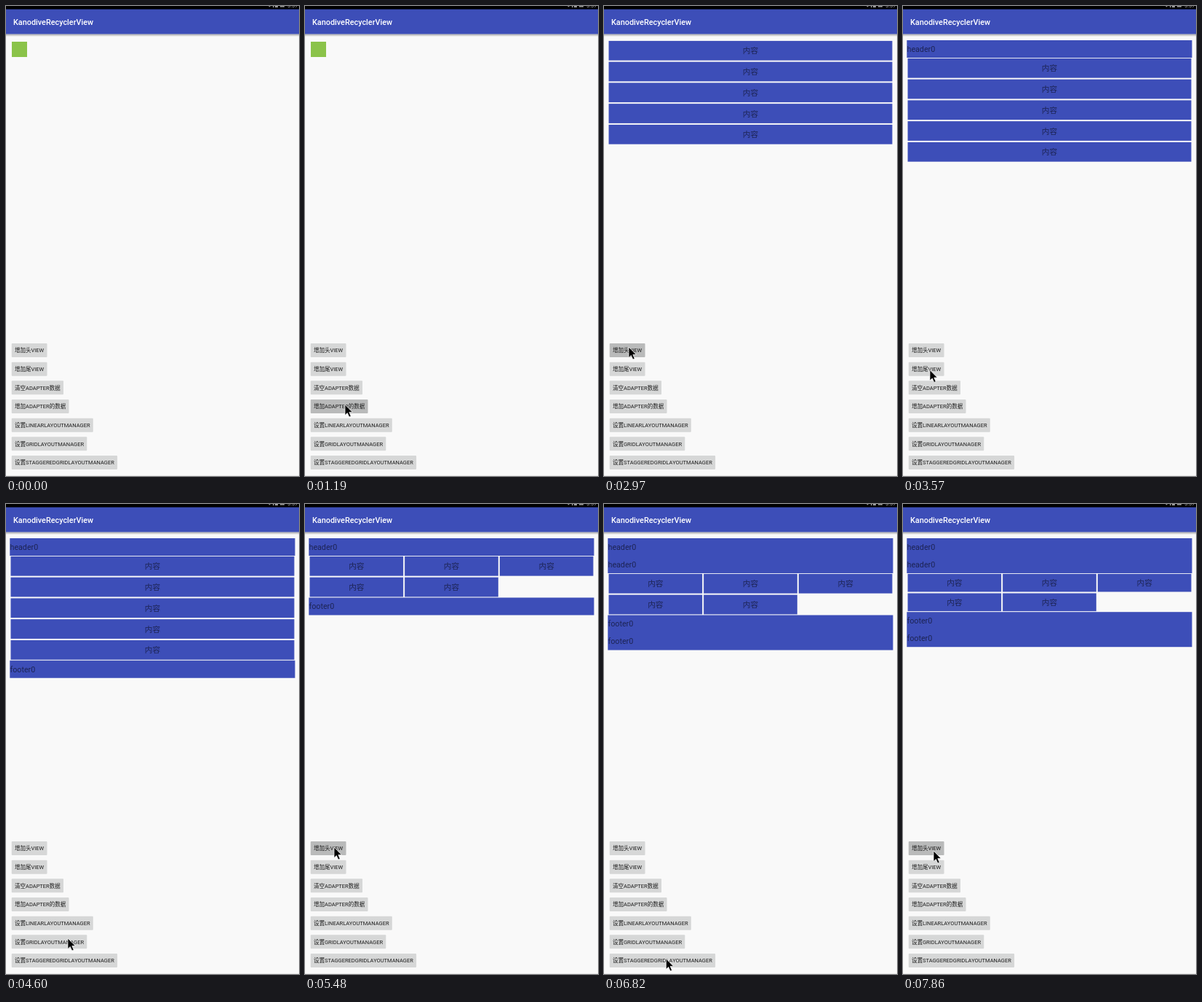
These frames come from a looping animation (403 by 645 pixels, 8 s). An HTML page:

```html
<!DOCTYPE html>
<html lang="zh-CN">
<head>
<meta charset="utf-8">
<title>RecyclerView demo</title>
<style>
  html, body { margin: 0; width: 100%; height: 100%; overflow: hidden; background: #f9f9f9; }
  svg { display: block; width: 403px; height: 645px; font-family: Roboto, "Noto Sans CJK SC", "Noto Sans CJK", sans-serif; }
  .title { font-size: 10.85px; font-weight: 500; fill: #fff; }
  .button { font-size: 7.5px; fill: #1c1c1c; }
  .row { font-size: 10.7px; fill: #1d2454; }
  .clock { font-size: 7.5px; fill: #aaa; }
</style>
</head>
<body>
<svg viewBox="0 0 403 645">
  <defs>
    <linearGradient id="shade" x2="0" y2="1">
      <stop stop-color="#000" stop-opacity=".35"/>
      <stop offset="1" stop-color="#000" stop-opacity="0"/>
    </linearGradient>
  </defs>
  <rect width="403" height="645" fill="#f9f9f9"/>
  <rect y="644" width="403" height="1" fill="#ececec"/>
  <rect y="38.500" width="403" height="3.500" fill="url(#shade)"/>
  <rect y="4" width="403" height="34.500" fill="#3d4eb8"/>
  <rect width="403" height="4.500" fill="#000"/>
  <path d="M361 0h3l-1.500 1.500zM367 0h1.500v2h-1.500zM370 0h4v2h-4zM377 0h6v1.500h-6z" fill="#999"/>
  <text class="clock" x="387" y="2">5:57</text>
  <text class="title" x="10" y="25.600">KanodiveRecyclerView</text>
  <g id="list"></g>
  <g id="buttons"></g>
  <path id="cursor" d="M0 0V14.500L3.300 11.500L5.800 17L8.200 16L5.800 10.500H10.300Z" fill="#000" stroke="#fff" stroke-width=".7"/>
</svg>
<script>
const LOOP = 8000, STEPS = 54;
const BLUE = '#3d4eb8';
const BAR = 24;
const $ = id => document.getElementById(id);

const labels = [
  '增加头VIEW', '增加尾VIEW', '清空ADAPTER数据', '增加ADAPTER的数据',
  '设置LINEARLAYOUTMANAGER', '设置GRIDLAYOUTMANAGER', '设置STAGGEREDGRIDLAYOUTMANAGER'
];
const HEADER = 0, FOOTER = 1, ITEMS = 3, GRID = 5, STAGGERED = 6;

// where the pointer goes, and what it presses there
const stops = [
  { step: 0, x: 309, y: 646 },
  { step: 5, x: 36, y: 519 },
  { step: 8, x: 55, y: 547, press: ITEMS },
  { step: 15, x: 74, y: 575 },
  { step: 20, x: 34, y: 468, press: HEADER },
  { step: 26, x: 37, y: 500, press: FOOTER },
  { step: 32, x: 85, y: 596, press: GRID },
  { step: 37, x: 40, y: 471, press: HEADER },
  { step: 41, x: 44, y: 494, press: FOOTER },
  { step: 48, x: 86, y: 626, press: STAGGERED },
  { step: 53, x: 42, y: 476, press: HEADER }
];

const rect = (x, y, w, h, fill, rx = 0) =>
  `<rect x="${x}" y="${y}" width="${w}" height="${h}" rx="${rx}" fill="${fill}"/>`;
const text = (cls, x, y, str, anchor = 'start') =>
  `<text class="${cls}" x="${x}" y="${y}" text-anchor="${anchor}">${str}</text>`;
const easeOut = k => 1 - (1 - k) ** 3;

// each move takes at most four steps and ends one step before its stop
function pointerAt(step) {
  const next = Math.max(1, stops.findIndex(s => s.step >= step));
  const from = stops[next - 1], to = stops[next];
  const end = to.step - 1, begin = Math.max(from.step, end - 4);
  const k = easeOut(Math.min(1, Math.max(0, (step - begin) / (end - begin))));
  return [from.x + (to.x - from.x) * k, from.y + (to.y - from.y) * k];
}

function bars(label, count, top) {
  let out = rect(5.3, top, 392.2, count * BAR, BLUE);
  for (let i = 0; i < count; i++) out += text('row', 5.5, top + i * BAR + 15.8, label);
  return out;
}

function listMarkup(step) {
  const pressed = button => stops.filter(s => s.press === button && s.step < step).length;
  if (!pressed(ITEMS)) return rect(8, 49, 21, 21, '#8bc34a');
  const headers = pressed(HEADER), footers = pressed(FOOTER);
  const columns = pressed(GRID) ? 3 : 1;
  const pitch = pressed(STAGGERED) ? 26.6 : 28.75;
  const top = 47 + headers * BAR, gap = 2;
  const width = (390 - gap * (columns - 1)) / columns, height = pitch - gap;
  let out = headers ? bars('header0', headers, 47) : '';
  for (let i = 0; i < 5; i++) {
    const x = 6.5 + (i % columns) * (width + gap);
    const y = top + 0.9 + Math.floor(i / columns) * pitch;
    out += rect(x, y, width, height, BLUE) +
      text('row', x + width / 2, y + height / 2 + 4, '内容', 'middle');
  }
  if (footers) out += bars('footer0', footers, top + Math.ceil(5 / columns) * pitch);
  return out;
}

// button boxes wrap their measured labels
const boxes = labels.map((label, i) => {
  const y = 463 + i * 25.67;
  $('buttons').insertAdjacentHTML('beforeend',
    `<g>${rect(7.7, y, 0, 19, '', 1)}${text('button', 12, y + 12.3, label)}</g>`);
  const [box, caption] = $('buttons').lastChild.children;
  box.setAttribute('width', caption.getComputedTextLength() + 8.6);
  return box;
});

function draw(ms) {
  // the small lead absorbs rounding at step boundaries
  const step = Math.floor((ms + 5) / LOOP * STEPS) % STEPS;
  if (step === draw.shown) return;
  draw.shown = step;
  const active = stops.find(s => s.step === step)?.press;
  $('list').innerHTML = listMarkup(step);
  boxes.forEach((box, i) => box.setAttribute('fill', i === active ? '#b9baba' : '#d6d7d7'));
  $('cursor').setAttribute('transform', `translate(${pointerAt(step)})`);
}

const start = performance.now();
function tick() {
  draw(performance.now() - start);
  requestAnimationFrame(tick);
}
tick();
</script>
</body>
</html>
```
